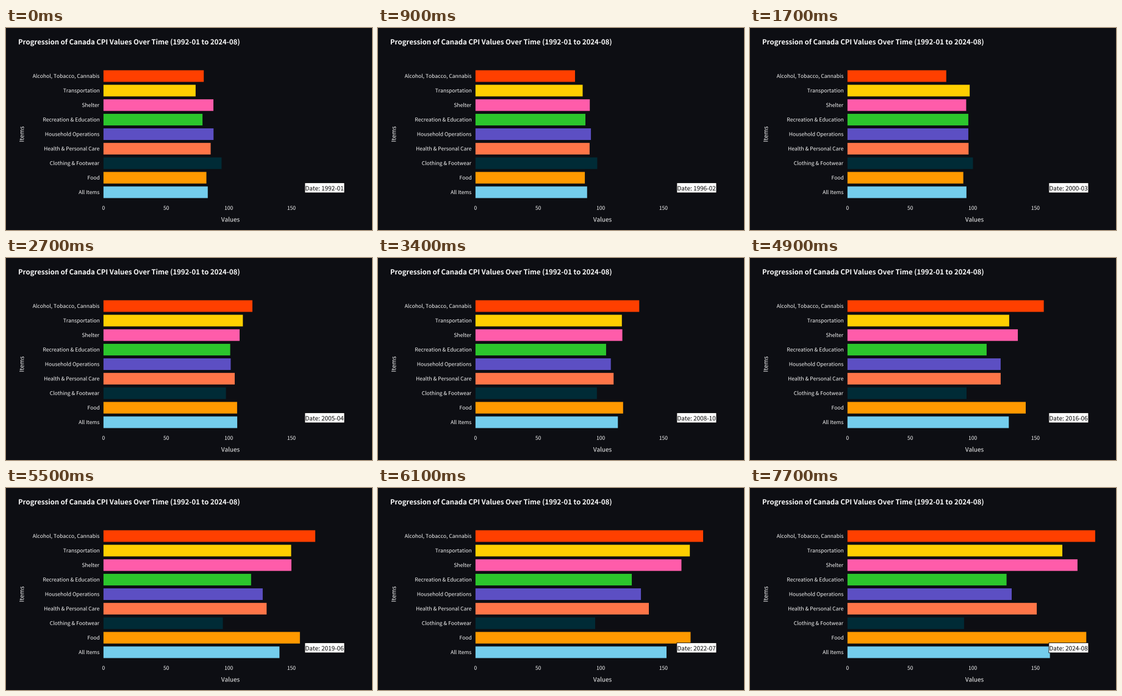
Write a matplotlib script that moves like this. It is 600 by 332 pixels and loops after 8000 ms.

```python
import matplotlib.pyplot as plt
import numpy as np
from matplotlib.animation import FuncAnimation
from matplotlib.patches import PathPatch, Rectangle
from matplotlib.textpath import TextPath
from matplotlib.transforms import Affine2D

W, H, DPI = 600, 332, 64
FRAMES, INTERVAL = 80, 100
MONTHS_PER_FRAME = 6.1
BG, INK, FONT = "#0d0e13", "#fafafa", "Noto Sans CJK JP"
X0, UNIT = 159.8, 2.055          # pixel of value 0, pixels per index point
TOP, STEP, BAR = 79.0, 23.87, 19.1
SMALL, MEDIUM, LARGE = 8.52, 9.94, 11.36

# Turning points in months since 1992-01; the bars run straight between them
TURNS = [0, 98, 159, 293, 366, 391]
ITEMS = {
    "Alcohol, Tobacco, Cannabis": ("#ff3f00", [80, 78.8, 118.8, 156.6, 181.6, 197.6]),
    "Transportation": ("#ffd000", [73.5, 97.5, 111.2, 129, 171, 171.4]),
    "Shelter": ("#ff5caa", [87.7, 94.7, 108.6, 135.9, 164.3, 183.5]),
    "Recreation & Education": ("#2cc62c", [79, 96.4, 101.1, 111, 124.7, 126.9]),
    "Household Operations": ("#5c4fc3", [87.8, 96.4, 101.5, 122.2, 132, 131]),
    "Health & Personal Care": ("#ff7548", [85.5, 96.6, 104.7, 122.2, 138.3, 151]),
    "Clothing & Footwear": ("#002b36", [94.2, 100.1, 97.7, 95, 95.5, 93]),
    "Food": ("#ff9900", [82.1, 92.4, 106.6, 142.2, 171.6, 190.5]),
    "All Items": ("#74cdec", [83.2, 94.9, 106.7, 128.7, 152.4, 161.5]),
}

fig = plt.figure(figsize=(W / DPI, H / DPI), dpi=DPI, facecolor=BG)
ax = fig.add_axes([0, 0, 1, 1])
ax.set_xlim(0, W)
ax.set_ylim(H, 0)
ax.axis("off")


def text_path(x, y, text, px, align=0.0, weight="normal", angle=0):
    """Outline of a line of text; align 0 is left, 0.5 centre, 1 right."""
    path = TextPath((0, 0), text, size=px, prop={"family": FONT, "weight": weight})
    ink = path.get_extents()
    place = (Affine2D().translate(-ink.x0 - align * ink.width, 0)
             .scale(1, -1).rotate_deg(-angle).translate(x, y))
    return place.transform_path(path)


def label(*args, color=INK, **kw):
    return ax.add_patch(PathPatch(text_path(*args, **kw), facecolor=color, lw=0, zorder=4))


def box(x, y, w, h, color, **kw):
    return ax.add_patch(Rectangle((x, y), w, h, facecolor=color, snap=False, **kw))


label(21, 27, "Progression of Canada CPI Values Over Time (1992-01 to 2024-08)",
      LARGE, weight="bold")
label(367.8, 318.3, "Values", MEDIUM, 0.5)
label(29.3, 174.2, "Items", MEDIUM, 0.5, angle=90)
for v in range(0, 151, 50):
    label(X0 + UNIT * v, 298.8, str(v), SMALL, 0.5)

bars = []
for k, (name, (color, _)) in enumerate(ITEMS.items()):
    mid = TOP + STEP * k
    label(153, mid + 3, name, SMALL, 1)
    bars.append(box(X0, mid - BAR / 2, 0, BAR, color, lw=0))

box(489.9, 254.4, 65, 16.5, "white", edgecolor="black", lw=0.8 * 72 / DPI, zorder=3)
date = label(491.4, 267.1, "Date:", MEDIUM, color="black")


def update(i):
    month = int(np.clip(round(MONTHS_PER_FRAME * (i - 1)), 0, TURNS[-1]))
    for bar, (_, values) in zip(bars, ITEMS.values()):
        bar.set_width(UNIT * np.interp(month, TURNS, values))
    stamp = f"Date: {1992 + month // 12}-{month % 12 + 1:02d}"
    date.set_path(text_path(491.4, 267.1, stamp, MEDIUM))
    return [*bars, date]


anim = FuncAnimation(fig, update, frames=FRAMES, interval=INTERVAL,
                     repeat=True, repeat_delay=0, blit=False)
plt.show()
```
